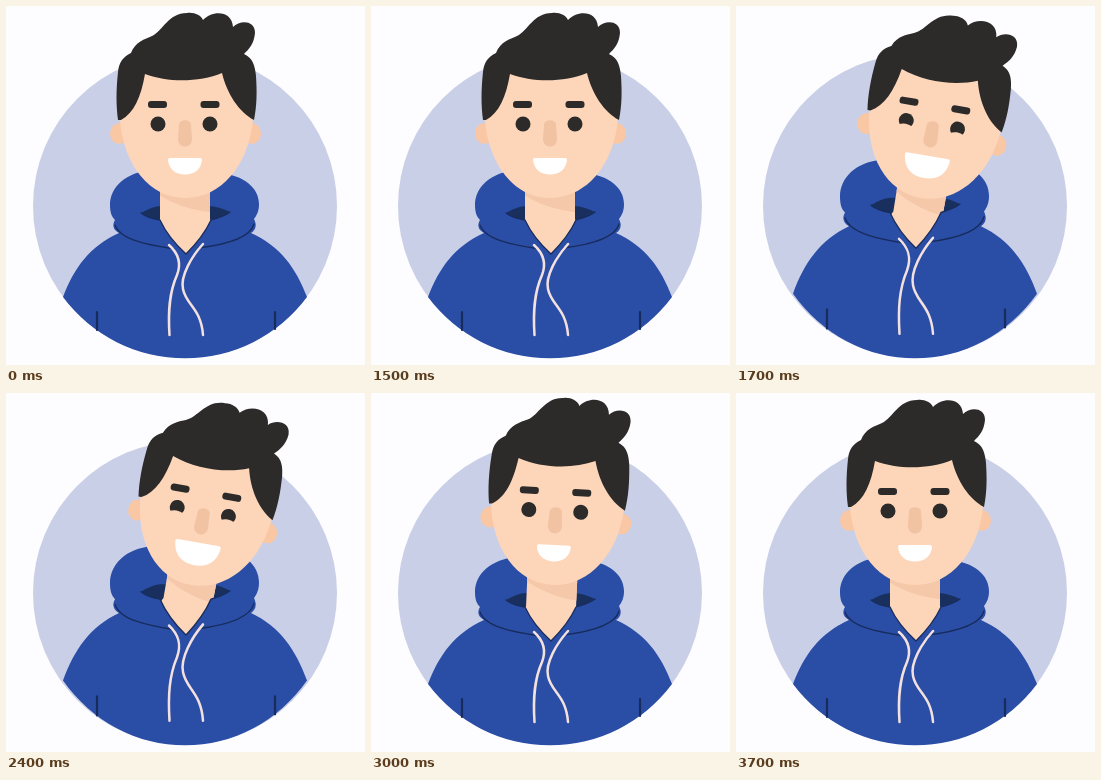
Write an HTML page that moves like this. It is 359x359 px and loops after 4000 ms.

```html
<!DOCTYPE html>
<html lang="en">
<head>
<meta charset="utf-8">
<title>Nodding avatar</title>
<style>
  html, body { margin: 0; width: 100%; height: 100%; overflow: hidden; background: #fdfcfe; }
  svg { display: block; width: 100%; height: 100%; }
  .skin { fill: #fdd6ba; }
  .shade { fill: #f5c8a9; }
  .ear { fill: #f9c7a3; }
  .nose { fill: #f1c3a3; }
  .hair { fill: #2c2b2a; }
  .blue { fill: #2a4da6; }
  .navy { fill: #19305f; }
  .seam { fill: none; stroke: #172c5c; stroke-width: 1.3; stroke-linecap: round; stroke-linejoin: round; }
  .fold { stroke: #172c5c; stroke-width: 2.2; stroke-linecap: round; }
  .cord { fill: none; stroke: #f3e1df; stroke-width: 2.5; stroke-linecap: round; }
</style>
</head>
<body>
<svg viewBox="0 0 359 359">
  <defs>
    <clipPath id="neckClip"><path id="neckEdge"/></clipPath>
  </defs>
  <circle cx="179" cy="200" r="152" fill="#cacfe8"/>

  <g class="body">
    <path class="blue" d="M146 164C120 166 104 181 104 199C104 207 106 211 109 214L120 232H240L248 213C251 209 253 205 253 198C253 182 238 169 213 167Z"/>
    <path class="navy" d="M135 207Q145 201 154 200H204Q214 201 224 206L204 217L180 248L154 217Z"/>
  </g>

  <path id="neck" class="skin"/>
  <g clip-path="url(#neckClip)">
    <path class="shade head" d="M145 183C162 197 184 205 212 207V170H145Z"/>
  </g>

  <g class="body">
    <path class="blue" d="M109 214C106 219 107 224 113 227C84 240 68 262 57 291A152 152 0 0 0 301 291C290 262 274 240 245 227C250 224 251 219 248 213L224 206C219 210 212 212 205 214C199 227 190 238 180 248C169 238 160 227 154 214C147 213 140 211 135 207Z"/>
    <path class="seam" d="M135 207C140 211 147 213 154 214C160 227 169 238 180 248C190 238 199 227 205 214C212 212 219 210 224 206"/>
    <path class="seam" d="M109 219C114 234 143 239 168 243M248 218C244 233 217 239 192 242"/>
    <path class="fold" d="M91 306V324M269 306V323"/>
    <path class="cord" d="M163 239C172 247 176 256 171 269C163 287 162 306 163.500 329M197 238C186 250 174 270 177 283C180 299 195 302 197 329"/>
  </g>

  <g class="head">
    <ellipse class="ear" cx="113.500" cy="127.500" rx="9.500" ry="10.500"/>
    <ellipse class="ear" cx="245.500" cy="127.500" rx="9.500" ry="10.500"/>
    <path class="skin" d="M114 100V113C117 159 144 192 179 192C215 192 243 159 247 113V100L220 55H138Z"/>
    <path id="hair" class="hair" d="M112 114C110 100 110 84 112 66C113 56 117 51 125 47C129 36 139 33 146 30C157 25 162 7 181 7C188 6 195 9 197 14C206 4 226 4 227 21C234 14 249 14 249 27C248 38 243 43 238 48C247 52 249 60 250 70C251 86 251 99 248 114C233 106 221 88 216 67C194 76 163 77 139 68C135 91 128 107 115 114Z"/>
    <path class="nose" d="M173 118C174 113 184 113 185 118L186 133C186 143 172 143 172 133Z"/>
    <rect class="hair" x="142" y="95" width="19" height="7" rx="3"/>
    <rect class="hair" x="194.500" y="95" width="19" height="7" rx="3"/>
    <circle class="hair" cx="152" cy="118" r="7.500"/>
    <circle class="hair" cx="204" cy="118" r="7.500"/>
    <ellipse class="skin cheek" cx="152" rx="10" ry="7"/>
    <ellipse class="skin cheek" cx="204" rx="10" ry="7"/>
    <path id="mouth" fill="#fff"/>
  </g>
</svg>
<script>
  const LOOP = 4000, STEP = 100;
  const PIVOT = { x: 182, y: 226 };
  const FLOOR = 352, HAIRLINE = 114;
  const TILT = 10;

  const byId = id => document.getElementById(id);
  const each = (name, fn) => document.querySelectorAll('.' + name).forEach(fn);
  const set = (el, key, value) => el.setAttribute(key, value);
  const mix = (a, b, k) => a + (b - a) * k;
  const ramp = (t, from, to) => Math.min(1, Math.max(0, (t - from) / (to - from)));
  const stretchY = (base, k) => `translate(0 ${base * (1 - k)}) scale(1 ${k})`;

  // Rises quickly, holds, then falls with acceleration until the given end.
  const hold = (t, end) => ramp(t, 1500, 1710) - ramp(t, 2500, end) ** 2;

  function turn(x, y, degrees) {
    const r = degrees * Math.PI / 180, c = Math.cos(r), s = Math.sin(r);
    const dx = x - PIVOT.x, dy = y - PIVOT.y;
    return [PIVOT.x + dx * c - dy * s, PIVOT.y + dx * s + dy * c];
  }

  function mouthPath(k) {
    const x = 179, w = mix(17, 23, k), top = mix(152, 149, k), low = mix(168.5, 172, k);
    const h = low - top;
    return `M${x - w + 2} ${top}H${x + w - 2}Q${x + w} ${top} ${x + w} ${top + 2}` +
      `C${x + w - 1} ${top + h * .7} ${x + w * .55} ${low} ${x} ${low}` +
      `C${x - w * .55} ${low} ${x - w + 1} ${top + h * .7} ${x - w} ${top + 2}` +
      `Q${x - w} ${top} ${x - w + 2} ${top}Z`;
  }

  // The top follows the head; the wide lower end is tucked under the collar.
  function neckPath(angle, stretch) {
    const y = v => FLOOR - (FLOOR - v) * stretch;
    const shift = angle * .35;
    return `M${turn(154, 172, angle)}L${turn(204, 172, angle)}` +
      `L${204 + shift} ${y(213)}L208 ${y(222)}L180 ${y(254)}` +
      `L150 ${y(222)}L${154 + shift} ${y(213)}Z`;
  }

  function draw(now) {
    const t = Math.floor(now % LOOP / STEP) * STEP;
    const angle = TILT * hold(t, 3100);
    const squint = hold(t, 2800), smile = hold(t, 2900);
    const bounce = Math.sin(Math.PI * ramp(t, 2900, 3400));
    const stretch = 1 + .057 * squint;
    const neck = neckPath(angle, stretch);

    each('head', el => set(el, 'transform', `rotate(${angle} ${PIVOT.x} ${PIVOT.y})`));
    each('body', el => set(el, 'transform', stretchY(FLOOR, stretch)));
    each('cheek', el => set(el, 'cy', mix(134, 128, squint)));
    set(byId('neck'), 'd', neck);
    set(byId('neckEdge'), 'd', neck);
    set(byId('mouth'), 'd', mouthPath(smile));
    set(byId('hair'), 'transform', stretchY(HAIRLINE, 1 + .037 * bounce));
  }

  function tick() {
    draw(performance.now());
    requestAnimationFrame(tick);
  }
  tick();
</script>
</body>
</html>
```
